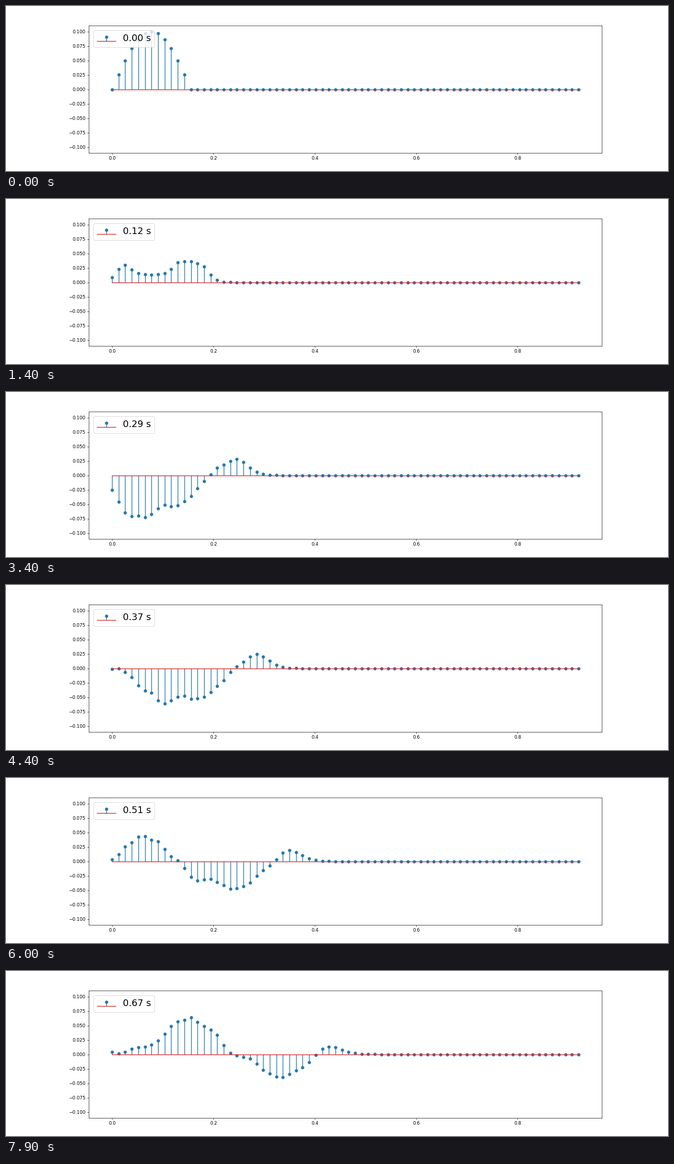
Recreate the animation shown at these times as a matplotlib script. Size 1280 by 320 pixels, loop 8000 ms.

```python
import numpy as np
import matplotlib.pyplot as plt
from matplotlib.animation import FuncAnimation

COUNT = 72          # coupled pendulums in a row
LENGTH = 0.92
FRAMES, INTERVAL = 80, 100
STEP = 0.00847      # simulated seconds per frame
COUPLING = 36.92    # spring rate between neighbours, rad/s
SWING = 7.38        # rate of a lone pendulum, rad/s

n = np.arange(COUNT)
x = np.linspace(0, LENGTH, COUNT)
start = np.where(n < 12, 0.1 * np.sin(np.pi * n / 12), 0)

# Normal modes of the chain, held by a wall past each end.
wave = np.pi * (n + 1) / (COUNT + 1)
modes = np.sqrt(2 / (COUNT + 1)) * np.sin(np.outer(n + 1, wave))
omega = np.sqrt(SWING**2 + (2 * COUPLING * np.sin(wave / 2))**2)
# Phase gained per step under the implicit trapezoid rule.
phase = 2 * np.arctan(omega * STEP / 2)
weights = modes.T @ start


def shape(step):
    return modes @ (weights * np.cos(phase * step))


fig, ax = plt.subplots(figsize=(20, 5), dpi=64)
stem = ax.stem(x, start)
ax.set_ylim(-0.11, 0.11)


def draw(frame):
    y = shape(frame)
    stem.markerline.set_ydata(y)
    stem.stemlines.set_segments([[(a, 0), (a, b)] for a, b in zip(x, y)])
    stem.set_label(f"{frame * STEP:.2f} s")
    ax.legend(loc="upper left", fontsize=20)
    return stem.markerline, stem.stemlines


anim = FuncAnimation(fig, draw, frames=FRAMES, interval=INTERVAL,
                     repeat=True, repeat_delay=0, blit=False)
plt.show()
```
